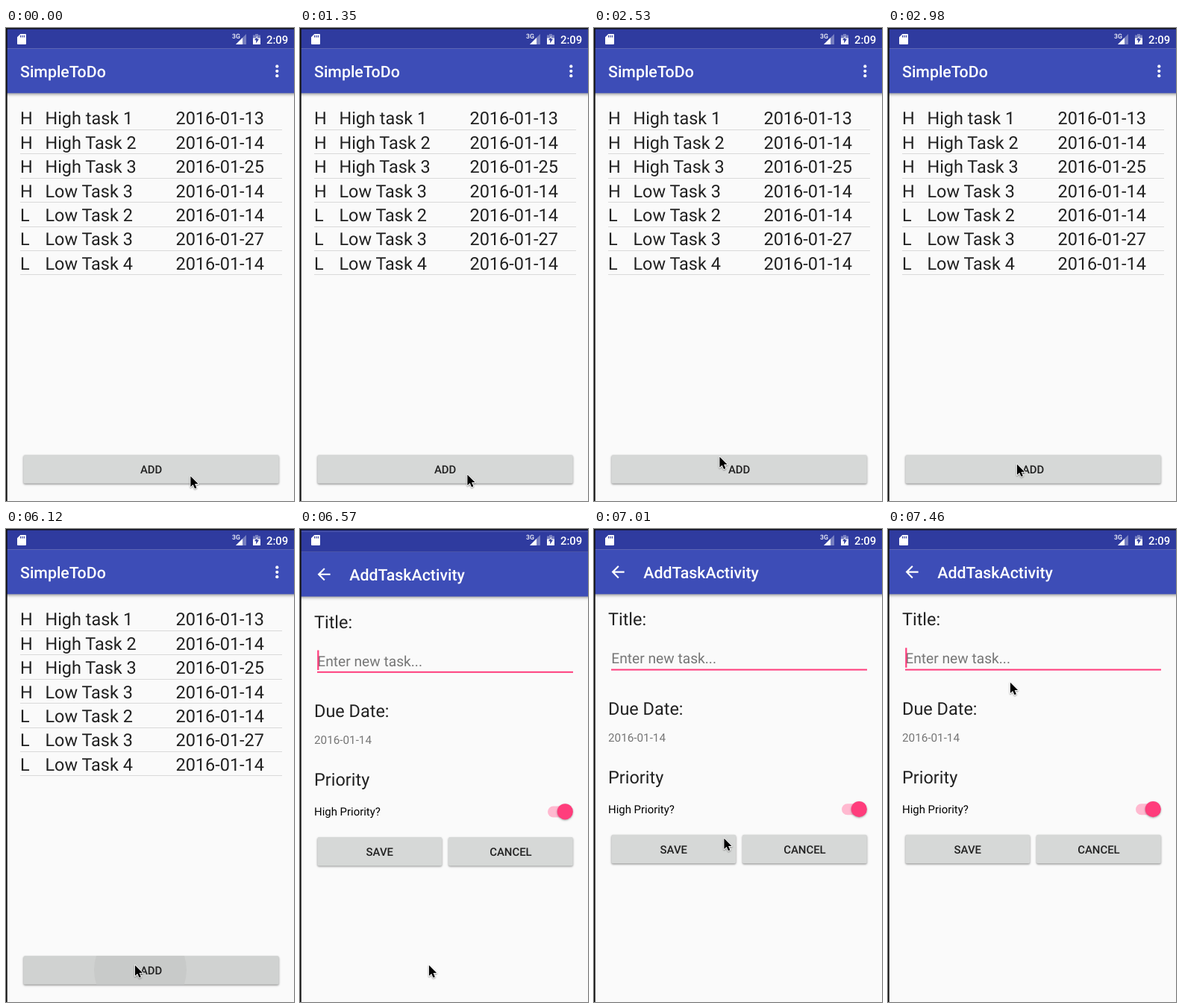
Animation of 386 by 634 pixels, one loop 8 s. Source, as an HTML page with a canvas:

```html
<!DOCTYPE html>
<html lang="en">
<head>
<meta charset="utf-8">
<title>To-do list</title>
<style>
html, body { margin: 0; width: 100%; height: 100%; overflow: hidden; background: #fafafa; }
canvas { display: block; width: 386px; height: 634px; }
</style>
</head>
<body>
<canvas id="stage"></canvas>
<script>
const W = 386, H = 634, LOOP = 8000;
const DP = 384 / 360;
const INK = '#212121', GREY = '#767676', PAPER = '#fafafa';
const BAR = '#3d4db7', STATUS = '#2f3b9f', PINK = '#ff3d7c';

const canvas = document.getElementById('stage');
const ctx = canvas.getContext('2d');
const ratio = window.devicePixelRatio || 1;
canvas.width = W * ratio;
canvas.height = H * ratio;

const tasks = [
  ['H', 'High task 1', '2016-01-13'],
  ['H', 'High Task 2', '2016-01-14'],
  ['H', 'High Task 3', '2016-01-25'],
  ['H', 'Low Task 3', '2016-01-14'],
  ['L', 'Low Task 2', '2016-01-14'],
  ['L', 'Low Task 3', '2016-01-27'],
  ['L', 'Low Task 4', '2016-01-14']
];

// Pointer stops: time, x, y
const stops = [
  [0, 247, 601], [1350, 224, 599], [1500, 155, 521.5], [1640, 144, 463],
  [1790, 144.5, 463], [1940, 160.5, 532], [2090, 166, 575], [2230, 168, 576],
  [2530, 168, 575], [2680, 168, 570.5], [2830, 168, 575], [2980, 172.5, 585],
  [6860, 173, 475.5], [7010, 174, 415], [7160, 163.5, 216.5], [7310, 163.5, 206]
];

function rect(x, y, w, h, color) {
  ctx.fillStyle = color;
  ctx.fillRect(x, y, w, h);
}

function shape(d, color) {
  ctx.fillStyle = color;
  ctx.fill(new Path2D(d));
}

function disc(x, y, r, color) {
  ctx.fillStyle = color;
  ctx.beginPath();
  ctx.arc(x, y, r, 0, Math.PI * 2);
  ctx.fill();
}

function roundRect(x, y, w, h, r) {
  ctx.beginPath();
  ctx.roundRect(x, y, w, h, r);
}

function text(str, x, y, sp, color = INK, weight = 400, align = 'left') {
  ctx.font = `${weight} ${sp * DP}px Roboto, sans-serif`;
  ctx.textAlign = align;
  ctx.fillStyle = color;
  ctx.fillText(str, x, y);
}

function shadow(blur, dy, alpha) {
  ctx.shadowColor = `rgba(0,0,0,${alpha})`;
  ctx.shadowBlur = blur * ratio;
  ctx.shadowOffsetY = dy * ratio;
}

function button(label, x, y, w, pressed) {
  const h = 38.4;
  ctx.save();
  shadow(2.5, 1.2, 0.42);
  ctx.fillStyle = pressed ? '#d0d2d1' : '#d6d8d7';
  roundRect(x, y, w, h, 2);
  ctx.fill();
  ctx.restore();
  if (pressed) {
    ctx.save();
    roundRect(x, y, w, h, 2);
    ctx.clip();
    disc(180, 591, 62, '#c8cac9');
    ctx.restore();
  }
  text(label, x + w / 2, y + 24.7, 14, INK, 500, 'center');
}

function toolbar(title, x) {
  ctx.save();
  shadow(4, 1.5, 0.4);
  rect(-10, 27.6, W + 20, 59.7, BAR);
  ctx.restore();
  rect(0, 0, W, 27.6, STATUS);
  text(title, x, 65.7, 20, '#fff', 500);
}

function statusIcons() {
  shape('M19.3 8H26Q27 8 27 9V21Q27 22 26 22H16Q15 22 15 21V12.3Z', '#fff');
  for (const x of [19, 21.4, 23.8]) rect(x, 9.8, 1.2, 2.8, STATUS);
  text('3G', 303, 14.3, 8.2, '#fff', 500);
  shape('M322 8V22H308Z', 'rgba(255,255,255,.35)');
  shape('M317 13V22H308Z', '#fff');
  shape('M334 8H338V9.5H341V22H331V9.5H334Z', 'rgba(255,255,255,.35)');
  shape('M331 13.5H341V22H331Z', '#fff');
  shape('M336.8 10.5V14.7H339L335.2 20.5V16.3H333Z', '#fff');
  shape('M336.8 13.5V14.7H339L335.2 20.5V16.3H333L334.9 13.5Z', STATUS);
  text('2:09', 378.3, 20.8, 14, '#fff', 500, 'right');
}

function listScreen(pressed) {
  toolbar('SimpleToDo', 19);
  for (const dy of [-6.4, 0, 6.4]) disc(363.3, 57.8 + dy, 2.1, '#fff');
  tasks.forEach(([level, name, due], i) => {
    const y = 129.4 + i * 32.4;
    text(level, 19, y, 22);
    text(name, 52.4, y, 22);
    text(due, 227.5, y, 22);
    rect(19, Math.round(y + 6.6), 351, 1, '#d9d9d9');
  });
  button('ADD', 23.4, 572.2, 342.4, pressed);
}

function formScreen(caret) {
  toolbar('AddTaskActivity', 66.3);
  ctx.save();
  ctx.translate(19.3, 44.8);
  ctx.scale(DP, DP);
  shape('M20 11H7.83l5.59-5.59L12 4l-8 8 8 8 1.41-1.41L7.83 13H20Z', '#fff');
  ctx.restore();

  text('Title:', 19, 129.4, 22);
  text('Enter new task...', 23.3, 180.3, 18, GREY);
  rect(23, 187.6, 343, 2, PINK);
  if (caret) rect(23.2, 159.3, 2.2, 26.5, PINK);

  text('Due Date:', 19, 249, 22);
  text('2016-01-14', 19, 285.2, 14.3, GREY);
  text('Priority', 19, 341.2, 22);
  text('High Priority?', 19, 381.2, 14, '#000');

  ctx.fillStyle = '#ffb9d0';
  roundRect(332, 368.3, 30, 15, 7.5);
  ctx.fill();
  ctx.save();
  shadow(2.5, 1, 0.35);
  disc(355.3, 375.6, 10.6, PINK);
  ctx.restore();

  button('SAVE', 23.4, 409.8, 166.8);
  button('CANCEL', 199, 409.8, 166.8);
}

function pointer(t) {
  const [, x, y] = stops.findLast(s => s[0] <= t);
  const arrow = new Path2D('M0 0V14.2L3.3 11.1L5.6 16.4L8 15.4L5.7 10.2H10.2Z');
  ctx.save();
  ctx.translate(x + 0.4, y - 0.2);
  ctx.lineJoin = 'round';
  ctx.lineWidth = 1.8;
  ctx.strokeStyle = '#fff';
  ctx.save();
  shadow(2, 1, 0.4);
  ctx.stroke(arrow);
  ctx.restore();
  ctx.fillStyle = '#000';
  ctx.fill(arrow);
  ctx.restore();
}

function draw(t) {
  ctx.setTransform(ratio, 0, 0, ratio, 0, 0);
  ctx.textRendering = 'geometricPrecision';
  rect(0, 0, W, H, PAPER);
  if (t < 6570) {
    listScreen(t >= 6120);
  } else {
    // The new screen arrives 3px low, then settles.
    const drop = t < 6720 ? 3.2 : 0;
    rect(0, 0, W, drop, STATUS);
    ctx.save();
    ctx.translate(0, drop);
    formScreen(t < 7010 || t >= 7460);
    ctx.restore();
  }
  statusIcons();
  rect(0, 0, W, 1.6, '#15161f');
  rect(0, 0, 1.7, H, '#111');
  pointer(t);
}

function tick() {
  draw(performance.now() % LOOP);
  requestAnimationFrame(tick);
}
tick();
</script>
</body>
</html>
```
